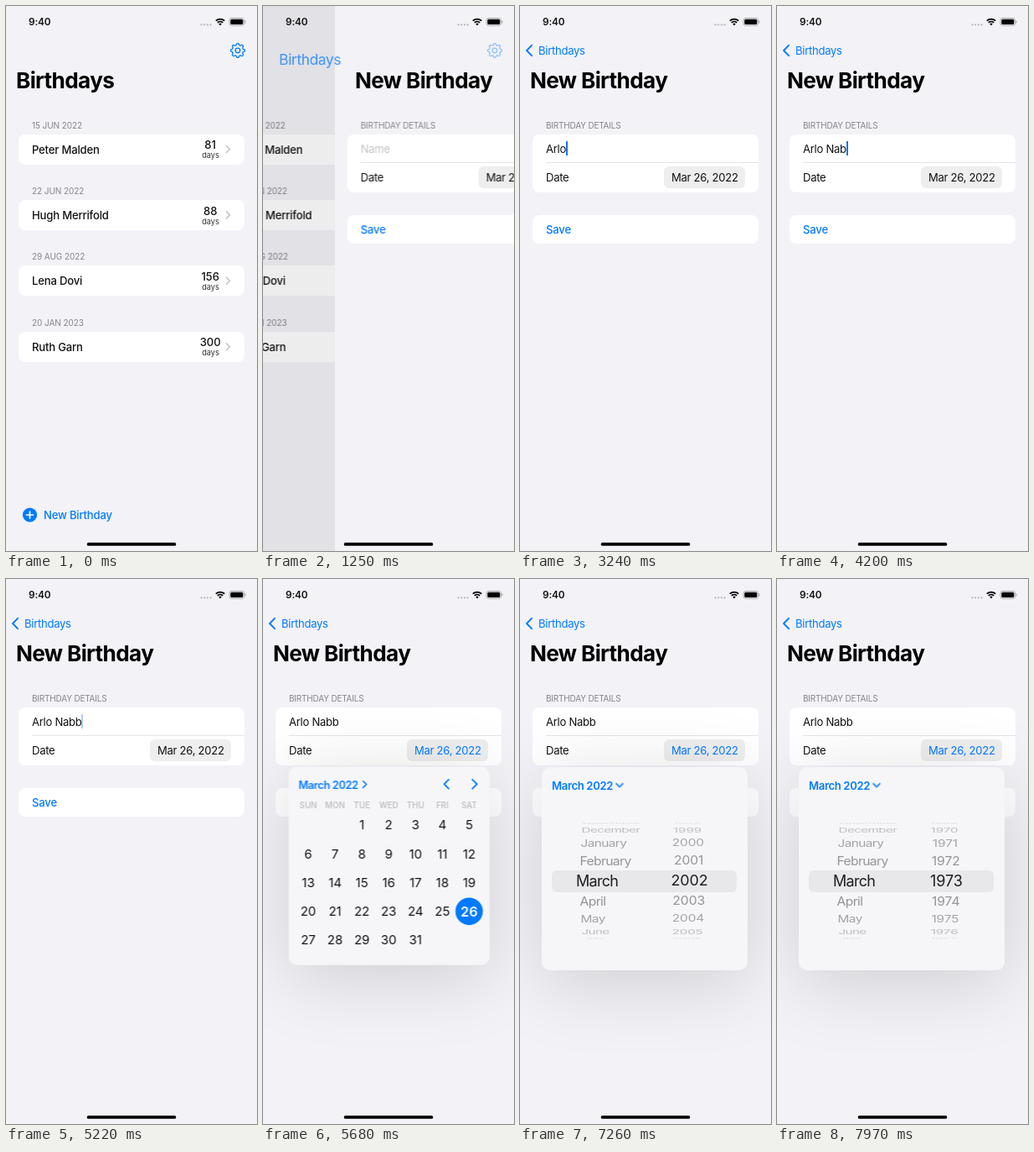
These frames come from a looping animation (300x649 px, 8 s). An HTML page:

```html
<!DOCTYPE html>
<html lang="en">
<head>
<meta charset="utf-8">
<title>Birthdays</title>
<style>
  :root { --blue: #007aff; --bg: #f2f2f7; --gray: #85858a; }
  html, body { margin: 0; width: 100%; height: 100%; overflow: hidden; background: var(--bg); }
  #stage {
    position: relative; width: 300px; height: 649px; overflow: hidden; background: var(--bg);
    font: 400 13.08px/20px Inter, Roboto, sans-serif; font-optical-sizing: none;
    letter-spacing: -.022em; color: #121214; white-space: nowrap;
  }
  .layer { position: absolute; inset: 0; }
  .page { background: var(--bg); }
  .t, .card { position: absolute; }
  .t { height: 20px; }
  .card { left: 15.4px; width: 269.2px; border-radius: 8px; background: #fff; }
  .head { left: 31px; font-size: 10px; letter-spacing: -.008em; color: var(--gray); }
  .medium, .name { font-weight: 500; letter-spacing: -.014em; }
  .name { left: 31px; }
  .mid { width: 60px; text-align: center; }
  .count { left: 214.2px; font-weight: 500; letter-spacing: 0; }
  .unit { left: 214.5px; font-size: 9.2px; letter-spacing: 0; color: #303034; }
  .big { left: 12px; font-size: 26.15px; font-weight: 700; letter-spacing: -.0245em; color: #000; transform-origin: 0 50%; }
  .blue { color: var(--blue); }
  svg { position: absolute; inset: 0; width: 300px; height: 649px; fill: none; stroke-linecap: round; stroke-linejoin: round; }

  /* one 8 s timeline for everything */
  .anim { animation: 8s infinite; }
  #list { animation-name: list; }
  #dim { background: #000; animation-name: dim; }
  #tools { animation-name: tools; }
  #form { animation-name: form; }
  #formTitle { top: 79px; animation-name: formTitle; }
  #oldTitle { top: 79px; animation-name: shrink, titleOut; }
  #backText { left: 22px; top: 43px; transform-origin: 0 50%; animation-name: backText; }
  #backArrow { animation-name: backArrow; }
  #gear { animation-name: gear; animation-timing-function: linear; }
  #dateText { left: 181px; top: 194px; animation-name: dateText; }
  #pop { transform-origin: 220px 204px; animation-name: pop; }
  #days { animation-name: days; }
  #wheel { animation-name: wheel; }
  #turn { transform-origin: 119px 245.5px; animation-name: turn; }

  @keyframes list { 0%, 12.25% { transform: none } 20.25%, 100% { transform: translateX(-90px) } }
  @keyframes dim { 0%, 12.25% { opacity: 0 } 20.25%, 100% { opacity: .1 } }
  @keyframes tools { 0%, 12.25% { opacity: 1 } 14.8%, 100% { opacity: 0 } }
  @keyframes form { 0%, 12.25% { transform: translateX(300px) } 20.25%, 100% { transform: none } }
  @keyframes formTitle { 0%, 12.25% { transform: translateX(343px) } 20.25%, 100% { transform: none } }
  @keyframes shrink { 0%, 12.25% { transform: none } 20.25%, 100% { transform: translate(10px, -36px) scale(.466) } }
  @keyframes titleOut { 0%, 12.25% { opacity: 1 } 16.5%, 100% { opacity: 0 } }
  @keyframes backText {
    0%, 12.25% { transform: translate(-10px, 36px) scale(2.15); opacity: 0 }
    20.25%, 100% { transform: none; opacity: 1 }
  }
  @keyframes backArrow { 0%, 16% { opacity: 0 } 20%, 100% { opacity: 1 } }
  @keyframes gear { 0%, 12.25% { opacity: 1 } 18%, 100% { opacity: 0 } }
  @keyframes dateText { 0%, 66.3% { color: #121214 } 69%, 100% { color: var(--blue) } }
  @keyframes pop {
    0%, 66.3% { transform: scale(.15); opacity: 0; animation-timing-function: cubic-bezier(.2, .7, .25, 1) }
    69.5% { opacity: 1 }
    73.4%, 100% { transform: none; opacity: 1 }
  }
  @keyframes days { 0%, 80.8% { opacity: 1 } 82.7%, 100% { opacity: 0 } }
  @keyframes wheel { 0%, 80.8% { opacity: 0 } 82.8%, 100% { opacity: 1 } }
  @keyframes turn { 0%, 80.8% { transform: none } 82.7%, 100% { transform: rotate(90deg) } }

  #field { left: 31px; top: 160px; white-space: pre; }
  #field.empty { color: #c4c4c7; }
  #caret { position: absolute; top: 161px; width: 1.5px; height: 17px; background: #1674ea; }
  #pill { position: absolute; left: 172px; top: 191px; width: 97px; height: 26px; border-radius: 6px; background: #eeeeef; }
  #line { position: absolute; left: 31px; top: 186px; width: 253.6px; height: 1px; background: #e4e4e7; }
  #sheet {
    position: absolute; left: 26px; top: 224px; width: 245.5px; height: 242px; border-radius: 10px;
    background: #f6f6f9; box-shadow: 0 15px 90px rgba(0, 0, 0, .15);
  }
  .week { font-size: 10px; font-weight: 600; letter-spacing: 0; color: #c3c3c7; }
  .day { font-size: 15.4px; letter-spacing: 0; }
  .picked { color: #fff; font-size: 16.6px; font-weight: 600; }
  #band { position: absolute; left: 38px; top: 347px; width: 221px; height: 26px; border-radius: 6px; background: #e8e8eb; }
  .row { position: absolute; left: 0; top: -10px; font-size: 18px; }
  .month { letter-spacing: -.04em; transform-origin: 0 50%; }
  .year { width: 60px; text-align: center; letter-spacing: -.005em; }
</style>
</head>
<body>
<div id="stage">
  <div id="list" class="layer page anim">
    <div id="people"></div>
    <div id="tools" class="anim">
      <svg><circle cx="28.5" cy="606" r="8.6" fill="#007aff"/><path d="M24.5 606h8M28.5 602v8" stroke="#fff" stroke-width="1.7"/></svg>
      <div class="t blue medium" style="left:45px;top:596px">New Birthday</div>
    </div>
    <div id="dim" class="layer anim"></div>
  </div>

  <div id="form" class="layer page anim">
    <div class="t head" style="top:131.5px;letter-spacing:-.02em">BIRTHDAY DETAILS</div>
    <div class="card" style="top:152.5px;height:69px"></div>
    <div id="line"></div>
    <div id="field" class="t"></div>
    <div id="caret"></div>
    <div class="t" style="left:31px;top:194px">Date</div>
    <div id="pill"></div>
    <div id="dateText" class="t anim">Mar 26, 2022</div>
    <div class="card" style="top:248.5px;height:34px"></div>
    <div class="t blue medium" style="left:31px;top:255.5px">Save</div>
  </div>

  <div id="formTitle" class="t big anim">New Birthday</div>
  <div id="oldTitle" class="t big anim">Birthdays</div>
  <div id="backText" class="t blue anim">Birthdays</div>
  <svg id="backArrow" class="anim"><path d="M14 46.8L8 53l6 6.2" stroke="#007aff" stroke-width="1.9"/></svg>
  <svg id="gear" class="anim" stroke="#007aff" stroke-width="1.3"><path id="teeth"/><circle cx="277" cy="53" r="2.8"/></svg>

  <div id="pop" class="layer anim">
    <div id="sheet"></div>
    <div class="t blue" style="left:38px;top:235.5px;font-weight:600;letter-spacing:-.026em">March 2022</div>
    <svg id="turn" class="anim"><path d="M117.2 241.6l4 3.9-4 3.9" stroke="#007aff" stroke-width="1.6"/></svg>
    <div id="days" class="layer anim">
      <svg><path d="M222 239.8l-5.6 5.4 5.6 5.4M251 239.8l5.6 5.4-5.6 5.4" stroke="#007aff" stroke-width="1.8"/>
        <circle cx="247" cy="400.5" r="16.8" fill="#007aff"/></svg>
    </div>
    <div id="wheel" class="layer anim"><div id="band"></div></div>
  </div>

  <div class="t" style="left:27px;top:9px;font-size:11.8px;font-weight:600;letter-spacing:-.01em">9:40</div>
  <svg>
    <g fill="#b4b4b8"><circle cx="233.5" cy="22.3" r="1.1"/><circle cx="237.2" cy="22.3" r="1.1"/><circle cx="240.9" cy="22.3" r="1.1"/><circle cx="244.6" cy="22.3" r="1.1"/></g>
    <g stroke="#000" stroke-width="1.7" stroke-linecap="butt"><path d="M250.8 17.6a7.6 7.6 0 0 1 10.4 0M252.8 19.9a4.7 4.7 0 0 1 6.4 0"/></g>
    <path d="M254.3 21.4a2.5 2.5 0 0 1 3.4 0L256 23.2z" fill="#000"/>
    <rect x="267" y="14.5" width="17.6" height="8.8" rx="2.6" stroke="#a5a5a9" stroke-width=".9"/>
    <rect x="268.3" y="15.8" width="15" height="6.2" rx="1.5" fill="#000"/>
    <path d="M286 17.6v2.6" stroke="#a5a5a9" stroke-width="1"/>
    <rect x="96.7" y="639" width="106.6" height="3.8" rx="1.9" fill="#000"/>
  </svg>
</div>

<script>
const $ = id => document.getElementById(id);
const clamp = (v, a = 0, b = 1) => Math.min(b, Math.max(a, v));

function add(parent, cls, text, x, y) {
  const el = document.createElement('div');
  el.className = cls;
  el.textContent = text;
  if (x != null) el.style.left = x + 'px';
  if (y != null) el.style.top = y + 'px';
  parent.append(el);
  return el;
}

// list of people
const people = [
  ['15 JUN 2022', 'Peter Malden', 81],
  ['22 JUN 2022', 'Hugh Merrifold', 88],
  ['29 AUG 2022', 'Lena Dovi', 156],
  ['20 JAN 2023', 'Ruth Garn', 300]
];
let arrows = '';
people.forEach(([date, name, left], i) => {
  const y = 170.5 + i * 78.4, box = $('people');
  add(box, 't head', date, null, y - 39);
  add(box, 'card', '', null, y - 18).style.height = '36px';
  add(box, 't name', name, null, y - 10);
  add(box, 't mid count', left, null, y - 15.3);
  add(box, 't mid unit', 'days', null, y - 2.3);
  arrows += `M263.5 ${y - 4}l4 4-4 4`;
});
$('people').insertAdjacentHTML('beforeend', `<svg><path d="${arrows}" stroke="#c2c2c6" stroke-width="1.5"/></svg>`);

// gear outline
let teeth = '';
for (let i = 0; i < 96; i++) {
  const a = i / 96 * Math.PI * 2, r = 7.5 + Math.tanh(2 * Math.cos(8 * a));
  teeth += `${i ? 'L' : 'M'}${(277 + r * Math.cos(a)).toFixed(2)} ${(53 + r * Math.sin(a)).toFixed(2)}`;
}
$('teeth').setAttribute('d', teeth + 'Z');

// calendar, the month starts on a Tuesday
const colX = c => 20 + c * 32.85;
'SUN MON TUE WED THU FRI SAT'.split(' ').forEach((d, c) => add($('days'), 't mid week', d, colX(c), 260.5));
for (let d = 1; d <= 31; d++) {
  const slot = d + 1;
  add($('days'), 't mid day' + (d === 26 ? ' picked' : ''), d, colX(slot % 7), 285.3 + Math.floor(slot / 7) * 35.2);
}

// picker wheels
const months = ['January', 'February', 'March', 'April', 'May', 'June', 'July',
  'August', 'September', 'October', 'November', 'December'];
const column = cls => Array.from({ length: 9 }, () => add($('wheel'), 'row ' + cls, ''));
const monthRows = column('month'), yearRows = column('year');
const STEP = 20.4 * Math.PI / 180, RADIUS = 69;

function spin(rows, pos, label, place) {
  rows.forEach((el, i) => {
    const value = Math.round(pos) + i - 4, d = value - pos;
    const far = Math.abs(d), angle = d * STEP, squash = Math.cos(angle);
    const near = clamp(1 - far), size = .87 + .13 * near - .012 * Math.max(0, far - 1);
    const alpha = squash < .04 ? 0 : far < .5 ? .88 : .42 * Math.pow(squash, .8);
    el.textContent = label(value);
    el.style.color = `rgba(0,0,0,${alpha})`;
    el.style.transform = `translate(${place(far, near)}px,${360 + RADIUS * Math.sin(angle)}px) scale(${size},${size * Math.max(0, squash)})`;
  });
}

// typed text
const NAME = 'Arlo Nabb';
const keyTimes = [2510, 2710, 2930, 3240, 3450, 3660, 3970, 4200, 4310];

function caretAlpha(t) {
  if (t < 2120 || t >= 5310) return 0;
  if (t < 4900) return 1;
  if (t < 5220) return clamp(1 - (t - 4860) / 120);
  return .35;
}

function render(t) {
  const count = keyTimes.filter(k => t >= k).length, field = $('field');
  field.textContent = count ? NAME.slice(0, count) : 'Name';
  field.classList.toggle('empty', !count);
  $('caret').style.left = 31 + (count ? field.offsetWidth : 0) + 'px';
  $('caret').style.opacity = caretAlpha(t);

  const u = clamp((t - 7090) / 900);
  const year = 2022 - 49 * (1 - Math.pow(1 - u, 2.5));
  spin(monthRows, 2, v => months[(v + 12) % 12], (far, near) => 67 + 4.5 * (1 - near) + Math.max(0, far - 1));
  spin(yearRows, year, v => v, far => 172.5 - .8 * far);
}

let start;
function tick(now) {
  start ??= now;
  render((now - start) % 8000);
  requestAnimationFrame(tick);
}
render(0);
requestAnimationFrame(tick);
</script>
</body>
</html>
```
